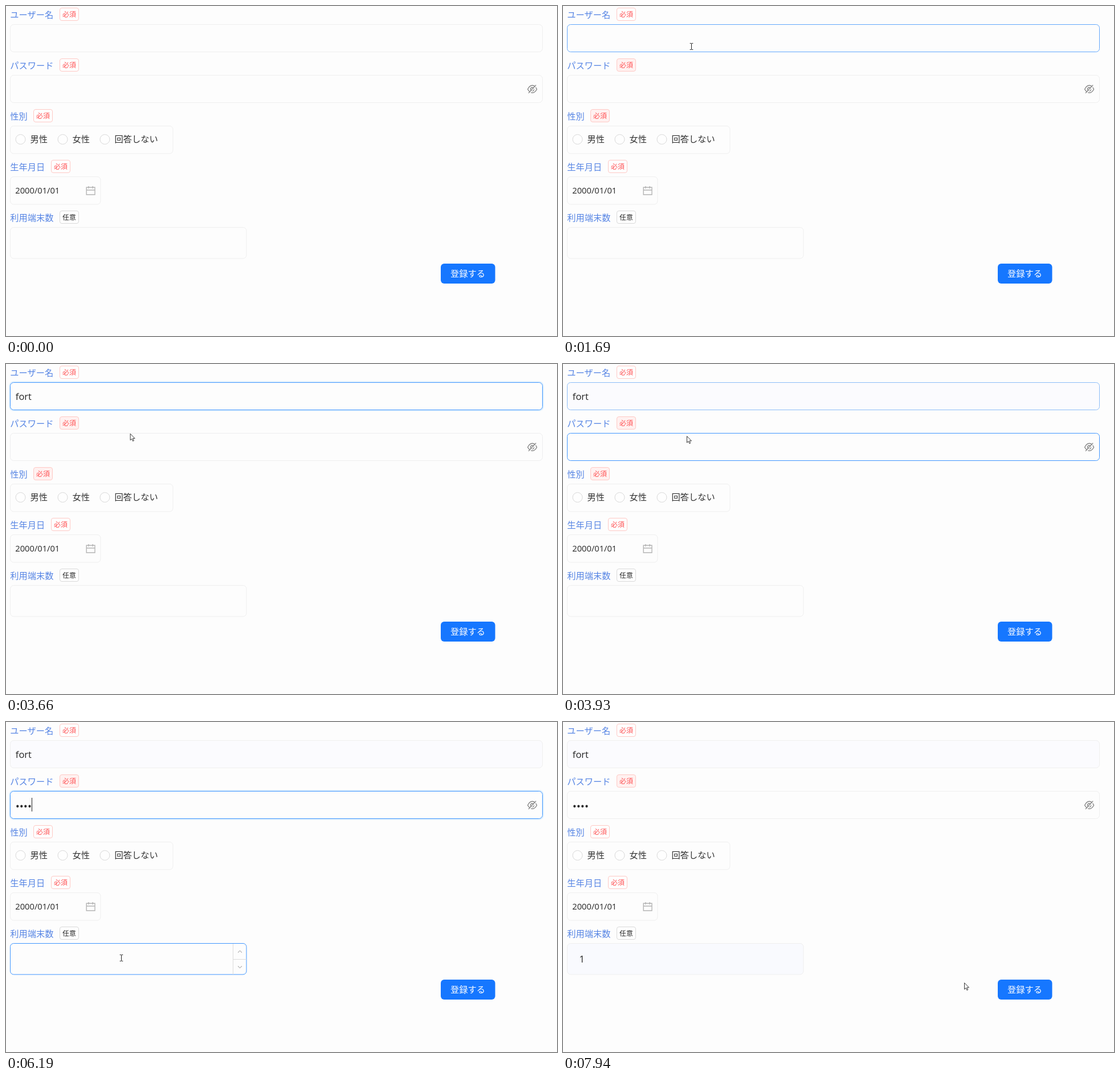
Write an HTML page that moves like this. It is 967x579 px and loops after 8000 ms.

```html
<!DOCTYPE html>
<html lang="ja">
<head>
<meta charset="utf-8">
<title>登録フォーム</title>
<style>
html, body { margin: 0; width: 100%; height: 100%; overflow: hidden; background: #fdfdfd; }
svg { display: block; width: 967px; height: 579px; }
text { font-family: "Open Sans", "Noto Sans", "Noto Sans CJK JP", "Noto Sans CJK", sans-serif; fill: #262626; white-space: pre; }
.ja { font-family: "Noto Sans CJK JP Light", "Noto Sans CJK JP", "Noto Sans CJK", sans-serif; font-size: 15.25px; font-weight: 300; fill: #333; }
.label { fill: #5584e4; }
.tag { font-size: 11.9px; font-weight: 400; }
.value { font-size: 16.5px; }
.mask { font-size: 18.7px; }
</style>
</head>
<body>
<svg id="stage" viewBox="0 0 967 579" xmlns="http://www.w3.org/2000/svg"></svg>
<script>
const LOOP = 8000;
const stage = document.getElementById('stage');

function set(el, attrs) {
  for (const key in attrs) el.setAttribute(key, attrs[key]);
}
function add(name, attrs, content) {
  const el = document.createElementNS('http://www.w3.org/2000/svg', name);
  set(el, attrs);
  if (content) el.textContent = content;
  stage.appendChild(el);
  return el;
}
const show = (el, on) => set(el, { visibility: on ? 'visible' : 'hidden' });
const addText = (x, y, cls, content) => add('text', { x, y, class: cls }, content);
const addLine = (d, stroke, width = 1) => add('path', { d, stroke, fill: 'none', 'stroke-width': width });

function addTag(x, y, content, border, color) {
  const box = add('rect', { x: x + .5, y: y + .5, width: 33, height: 22, rx: 3.5, fill: '#fefefe', stroke: border });
  addText(x + 5, y + 16.1, 'ja tag', content).style.fill = color;
  return box;
}
function addBox(y, w, h) {
  return add('rect', { x: 7.5, y: y + .5, width: w, height: h, rx: 6, fill: '#fdfdfd', stroke: '#efefef' });
}

// Labels with their tags
const rows = [['ユーザー名', 94], ['パスワード', 94], ['性別', 48], ['生年月日', 79], ['利用端末数', 94]];
const tags = rows.map(([name, tagX], i) => {
  const y = 89 * i;
  addText(7.2, y + 20.8, 'ja label', name);
  return i < 4
    ? addTag(tagX, y + 3, '必須', '#ffc9c5', '#ff4d4f')
    : addTag(tagX, y + 3, '任意', '#d9d9d9', '#262626');
});

// Inputs: layout, typed value with key times, and when each is hovered, focused and left
const inputs = [
  { y: 32, w: 934, h: 48, value: 'fort', cls: 'value', inset: 9.3, drop: 7, done: '#fbfbfe',
    hover: 1570, focus: 1900, blur: 3800, keys: [2510, 2660, 2930, 3080] },
  { y: 121, w: 934, h: 48, value: '••••', cls: 'mask', inset: 9.3, drop: 8.5, done: '#fdfdfd',
    hover: 3660, focus: 4000, blur: 6250, keys: [4350, 4500, 4620, 4910] },
  { y: 388, w: 414.5, h: 54.5, value: '1', cls: 'value', inset: 21.1, drop: 7, done: '#f9fafe',
    hover: 6040, focus: 6250, blur: 7270, keys: [6740] }
];
for (const f of inputs) {
  f.glow = add('rect', { x: 6, y: f.y - 1, width: f.w + 3, height: f.h + 3, rx: 7.5,
    fill: 'none', stroke: '#0591ff', 'stroke-width': 2 });
  f.box = addBox(f.y, f.w, f.h);
  f.text = addText(7.5 + f.inset, f.y + f.h / 2 + f.drop, f.cls, '');
}
const count = inputs[2];

// Radio buttons and date
addBox(210, 285.5, 48.5);
['男性', '女性', '回答しない'].forEach((name, i) => {
  const cx = 25.5 + 74 * i;
  add('circle', { cx, cy: 234, r: 8.5, fill: '#fefefe', stroke: '#d9d9d9' });
  addText(cx + 17, 239.4, 'ja', name);
});
addBox(299, 158.5, 48.5);
addText(16.3, 329.4, '', '2000/01/01').style.fontSize = '14.7px';

// Calendar icon
addLine('M141.2 318.2H156V331H141.2ZM141.2 323H156M145 316V320.3M152.2 316V320.3', '#b4b4b4', 1.4);

// Crossed eye icon
addLine('M915.6 146Q919 139.3 923.8 139.3Q928.4 139.3 931.6 146Q928.4 152.3 923.8 152.3Q919 152.3 915.6 146Z', '#858585', 1.4);
add('circle', { cx: 923.6, cy: 146, r: 3, fill: 'none', stroke: '#858585', 'stroke-width': 1.3 });
addLine('M918.3 154L931.3 139.8', '#fdfdfd', 1.4);
addLine('M917 152.9L930.2 138.6', '#858585', 1.4);

// Number stepper
const stepper = [
  addLine('M398.5 389V443M398.5 416.5H422', '#dcdcdc'),
  addLine('M407 404.6L410.5 401.2L414 404.6M407 428.2L410.5 431.6L414 428.2', '#8c8c8c')
];

// Submit button
add('rect', { x: 763, y: 452, width: 95.5, height: 35, rx: 6, fill: '#1677ff' });
addText(780, 475.4, 'ja', '登録する').style.fill = '#fff';

// Caret and pointers
const caret = add('rect', { width: 1, height: 24, fill: '#222' });
const arrow = add('path', { d: 'M.5 .7V12L3.1 9.6L4.9 13.6L6.7 12.8L4.9 8.9H8.5Z',
  fill: '#fff', stroke: '#222', 'stroke-width': .9 });
const beam = addLine('M-2.8 -5.5H-.7L0 -5L.7 -5.5H2.8M0 -5V5M-2.8 5.5H-.7L0 5L.7 5.5H2.8', '#222');

// Pointer moves, each easing out to its end
const ENTER = 1190;
const moves = [
  { at: 1220, span: 470, x: 225.5, y: 71 },
  { at: 3300, span: 630, x: 217, y: 126 },
  { at: 4850, span: 120, x: 224, y: 148 },
  { at: 5300, span: 260, x: 217, y: 305 },
  { at: 5640, span: 600, x: 202.5, y: 414 },
  { at: 6840, span: 480, x: 471, y: 420 },
  { at: 7700, span: 240, x: 704, y: 457 }
];

const ramp = (t, start, span) => Math.min(1, Math.max(0, (t - start) / span));
const easeOut = u => 1 - (1 - u) ** 3;
const pulse = (t, on, off, release) => ramp(t, on, 150) * (1 - ramp(t, off, release));

function pointerAt(t) {
  const p = { x: 799, y: 225 };
  for (const m of moves) {
    const k = easeOut(ramp(t, m.at, m.span));
    p.x += (m.x - p.x) * k;
    p.y += (m.y - p.y) * k;
  }
  return p;
}
function inside(p, f, pad) {
  return p.x > 7 + pad && p.x < 7 + f.w - pad && p.y > f.y + pad && p.y < f.y + f.h - pad;
}

function drawInput(f, t) {
  const level = pulse(t, f.hover, f.blur, 300);
  const color = [64, 150, 255].map(c => Math.round(239 + (c - 239) * level));
  set(f.box, { stroke: `rgb(${color})`, fill: t > f.blur ? f.done : '#fdfdfd' });
  set(f.glow, { opacity: .11 * pulse(t, f.focus, f.blur, 120) });
  f.text.textContent = f.value.slice(0, f.keys.filter(k => k <= t).length);
}

// The caret blinks each half second, restarting with every key
function drawCaret(t) {
  const f = inputs.find(f => t >= f.focus && t < f.blur);
  const since = f && t - Math.max(f.focus, ...f.keys.filter(k => k <= t));
  show(caret, f && since % 1000 < 500);
  if (!f) return;
  const width = f.text.textContent ? f.text.getComputedTextLength() : 0;
  set(caret, { x: Math.round(7.5 + f.inset + width), y: Math.round(f.y + (f.h - 24) / 2) });
}

function drawPointer(t) {
  const p = pointerAt(t);
  const editing = inputs.some(f => inside(p, f, 6));
  show(arrow, t >= ENTER && !editing);
  show(beam, t >= ENTER && editing);
  set(editing ? beam : arrow, { transform: `translate(${p.x} ${p.y})` });
  stepper.forEach(part => show(part, inside(p, count, 0)));
}

function draw(t) {
  inputs.forEach(f => drawInput(f, t));
  set(tags[1], { fill: t < 1690 ? '#fefefe' : '#fff1f0' });
  set(tags[2], { fill: t < 1690 || t > 5370 ? '#fefefe' : '#fff1f0' });
  drawCaret(t);
  drawPointer(t);
}

function tick() {
  draw(performance.now() % LOOP);
  requestAnimationFrame(tick);
}
tick();
</script>
</body>
</html>
```
